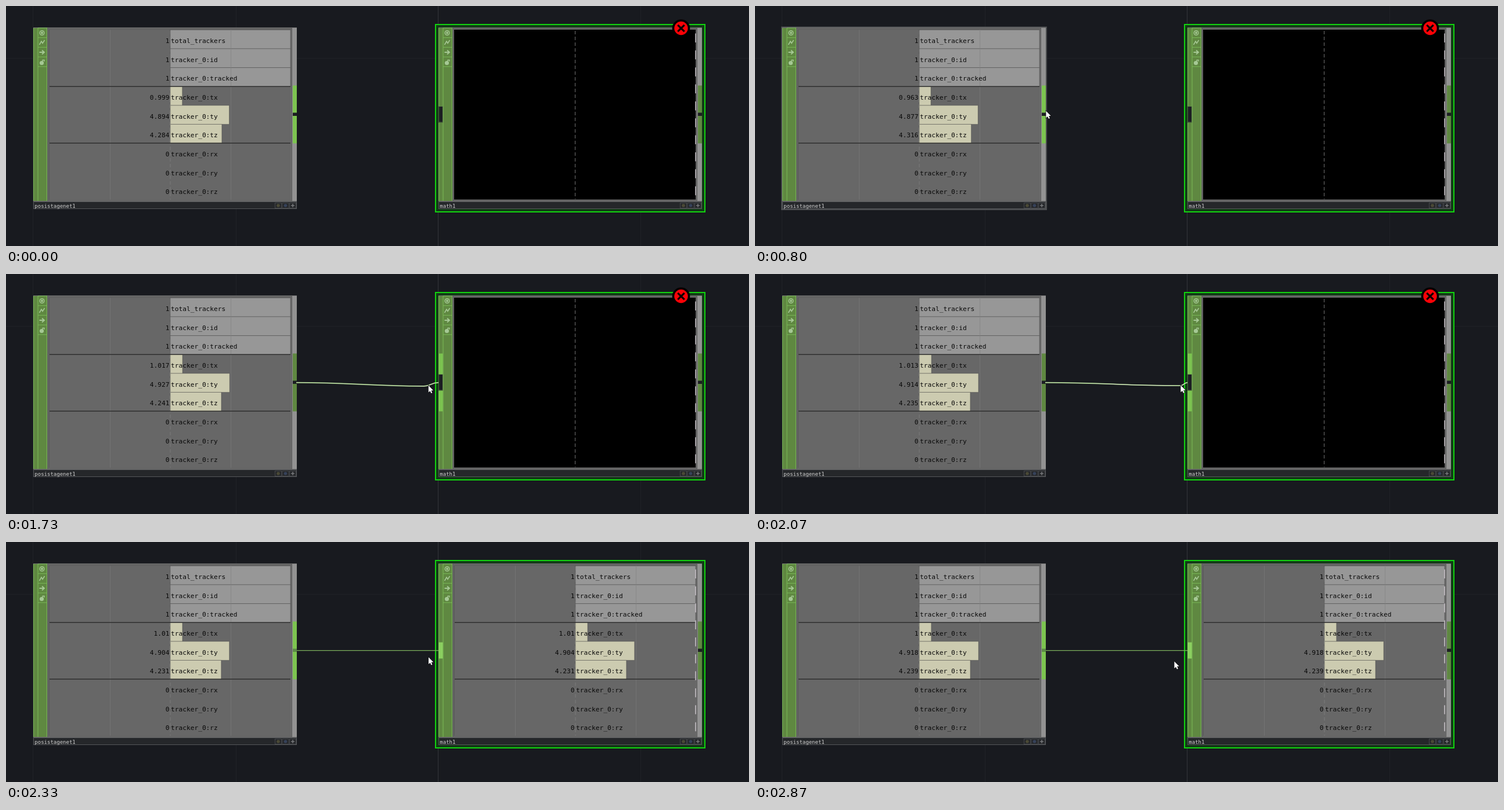
Write an HTML page with a canvas that moves like this. It is 1280 px wide and 415 px high and loops after 2940 ms.

```html
<!DOCTYPE html>
<html lang="en">
<head>
<meta charset="utf-8">
<title>Node wiring</title>
<style>
  html, body { margin: 0; width: 100%; height: 100%; overflow: hidden; background: #181a1f; }
  canvas { display: block; width: 100vw; height: 100vh; }
</style>
</head>
<body>
<canvas id="stage" width="1280" height="415"></canvas>
<script>
const ctx = document.getElementById('stage').getContext('2d');
const LOOP = 2940, STEP = 200 / 3, LAST = 43;
const HOVER = 599, LEAVE = 1199, DRAG = 1265, SNAP = 1665, JOIN = 2130;
const ROW_TOP = 41.3, ROW_H = 32.65, UNIT = 20.75;
const BACK = '#181a1f', GREEN = '#5f8841', BRIGHT = '#7cc450', LINE = '#79b857', DARK = '#1c1e22';
const MONO = '"DejaVu Sans Mono", monospace';
const NAMES = ['total_trackers',
  ...['id', 'tracked', 'tx', 'ty', 'tz', 'rx', 'ry', 'rz'].map(s => 'tracker_0:' + s)];

// turning points of the tracked position
const TRACK = [
  { at: 0, pos: [.999, 4.894, 4.284] },
  { at: 800, pos: [.963, 4.877, 4.316] },
  { at: 1267, pos: [1.022, 4.944, 4.248] },
  { at: 2333, pos: [1.01, 4.904, 4.231] },
  { at: 2867, pos: [1, 4.918, 4.239] }
];

const mix = (a, b, k) => a + (b - a) * k;
const progress = (t, from, length) => Math.min(1, Math.max(0, (t - from) / length));
const easeOut = (u, power) => 1 - (1 - u) ** power;

function tracked(t) {
  const next = Math.max(1, TRACK.findIndex(key => key.at >= t - 1));
  const a = TRACK[next - 1], b = TRACK[next];
  const k = progress(t, a.at, b.at - a.at);
  return a.pos.map((v, i) => mix(v, b.pos[i], k));
}

// the pointer comes in, drags the wire, then draws back
function pointerAt(t) {
  if (t < 1185) {
    const k = easeOut(progress(t, 200, 470), 2);
    return [mix(605, 501, k), mix(425, 181, k)];
  }
  if (t < JOIN) {
    const k = easeOut(progress(t, 1185, 720), 2.6);
    return [mix(502, 733, k), mix(182, 192, k) + 27 * k * (1 - k)];
  }
  const k = easeOut(progress(t, JOIN, 470), 1.2);
  return [mix(733, 722, k), mix(192, 206, k)];
}

function box(x, y, w, h, color) {
  ctx.fillStyle = color;
  ctx.fillRect(x, y, w, h);
}

function frame(x, y, w, h, color, width = 1) {
  ctx.strokeStyle = color;
  ctx.lineWidth = width;
  ctx.strokeRect(x, y, w, h);
}

function path(points, color, width = 1, dash = []) {
  ctx.beginPath();
  points.forEach(([x, y]) => ctx.lineTo(x, y));
  ctx.strokeStyle = color;
  ctx.lineWidth = width;
  ctx.setLineDash(dash);
  ctx.stroke();
  ctx.setLineDash([]);
}

const upright = (x, top, bottom, ...style) => path([[x, top], [x, bottom]], ...style);

function disc(x, y, r, color) {
  ctx.beginPath();
  ctx.arc(x, y, r, 0, Math.PI * 2);
  ctx.fillStyle = color;
  ctx.fill();
}

function label(text, x, y, size, color, align = 'left') {
  ctx.font = `${size}px ${MONO}`;
  ctx.textAlign = align;
  ctx.fillStyle = color;
  ctx.fillText(text, x, y);
}

function grid() {
  box(0, 0, 1280, 415, BACK);
  for (const x of [46, 396, 1093]) box(x, 0, 1, 415, '#202227');
  box(0, 90, 1280, 1, '#202227');
  box(744, 0, 1, 415, '#34363a');
}

function flagIcons() {
  const tone = '#a5c894';
  disc(62, 46.5, 4.5, tone);
  disc(62, 46.5, 3.1, GREEN);
  disc(62, 46.5, 1.9, tone);
  path([[57.5, 67], [61, 61], [63, 64.5], [66.5, 59]], tone, 1.6);
  path([[57.5, 80], [65, 80]], tone, 2);
  path([[62, 76.5], [66, 80], [62, 83.5]], tone, 1.8);
  disc(61.5, 98.5, 3.6, tone);
  path([[63, 97], [63, 93.5], [66, 93.5], [66, 96]], tone, 1.3);
}

function bar(row, value) {
  const y = ROW_TOP + row * ROW_H;
  const unit = row < 3;
  const width = unit ? 207 : value * UNIT;
  box(283, y, width, ROW_H, unit ? '#979797' : '#cccbb0');
  frame(283, y, width, ROW_H, 'rgba(60, 60, 60, .4)');
  if (unit) box(387, y, 1, ROW_H - 1, '#888');
}

function channels(values) {
  box(75, 41, 416, 294, '#676767');
  for (const x of [179, 387]) box(x, 41, 1, 294, '#737373');
  upright(283, 43, 335, '#7c7c7c', 1, [6, 4]);
  values.forEach((v, i) => { if (v) bar(i, v); });
  upright(283, 140, 237, '#96968a', 1, [6, 4]);
  for (const row of [3, 6]) box(75, ROW_TOP + row * ROW_H - .7, 415, 1.2, '#202020');
  values.forEach((v, i) => {
    const y = 64 + i * ROW_H;
    label(String(+v.toFixed(3)), 281.5, y, 11.2, '#080808', 'right');
    label(NAMES[i], 284, y, 11.2, '#080808');
  });
}

function emptyPanel() {
  box(74, 41, 416, 293.5, '#000');
  upright(282.5, 43, 334, '#707070', 1, [6, 4]);
}

function footer(name) {
  box(47, 338, 454, 13, '#25272a');
  frame(47.5, 338.5, 453, 12, '#55575a');
  label(name, 49.3, 348.5, 9, '#d0d0d0');
  for (let i = 0; i < 3; i++) frame(463.5 + i * 12.5, 340.5, 11, 9, '#45474a');
  disc(469, 345, 2.8, '#4b4a36');
  disc(481.5, 345, 2.8, '#36425a');
  path([[491, 345], [497, 345]], '#808285', 1.3);
  upright(494, 342, 348, '#808285', 1.3);
}

function node(dx, name, values, hot, joined) {
  ctx.save();
  ctx.translate(dx, 0);
  box(47, 37, 454, 301, '#5a5a5a');
  frame(47.5, 37.5, 453, 300, '#6c6c6c');
  box(48, 38, 23, 299, GREEN);
  for (const x of [47.5, 55, 70.5]) upright(x, 38, 337, LINE, 1.1);
  for (let i = 0; i < 5; i++) path([[55, 38 + i * 16.7], [71, 38 + i * 16.7]], LINE);
  flagIcons();
  box(71, 38, 422, 299, '#595959');
  frame(73, 39.5, 418.5, 296.5, '#707070');
  if (values) channels(values); else emptyPanel();
  box(493, 38, 8, 299, '#929292');
  box(494, 137.5, 7, 100, hot ? BRIGHT : GREEN);
  box(494, 184.5, 7, 5.5, joined ? '#5c8b46' : DARK);
  footer(name);
  ctx.restore();
}

function hoverRim() {
  box(45, 35.5, 458, 317.5, '#3e4043');
  frame(46, 36.5, 456, 315.5, '#56585b');
}

function selectionRim() {
  box(739, 31, 466, 326, '#123a16');
  frame(740, 32, 464, 324, '#12d40f', 2);
}

function inputPort(snapped, joined) {
  if (snapped && !joined) box(745, 137.5, 7.5, 100, BRIGHT);
  box(745, 173.5, 7.5, 28, joined ? '#8bd060' : DARK);
  if (!joined) frame(745.5, 173.5, 7, 27.5, '#6d9b54', .6);
}

function errorBadge() {
  const x = 1163, y = 38.5, arm = 5.7;
  disc(x, y, 15.3, '#000');
  disc(x, y, 11.7, '#fb0207');
  for (const side of [-arm, arm]) path([[x - side, y - arm], [x + side, y + arm]], '#000', 3.2);
}

function looseWire([x, y], snapped) {
  const bend = (x - 501) * .45;
  const end = y + (snapped ? 1 : 0);
  ctx.beginPath();
  ctx.moveTo(500, 187.7);
  ctx.bezierCurveTo(501 + bend, 187.7, x - bend, end, x, end);
  if (snapped) ctx.bezierCurveTo(mix(x, 745, .45), end, mix(x, 745, .5), 188, 745, 187.8);
  for (const [color, width] of [['#6fa552', 1.9], ['#dce8cb', 1.1]]) {
    ctx.strokeStyle = color;
    ctx.lineWidth = width;
    ctx.stroke();
  }
}

function pointer([x, y]) {
  const shape = [[0, 0], [0, 12], [2.7, 9.5], [4.6, 13.5], [6.5, 12.6], [4.7, 8.6], [8.3, 8.5]];
  ctx.beginPath();
  shape.forEach(([px, py]) => ctx.lineTo(x + .4 + px, y + .4 + py));
  ctx.closePath();
  ctx.strokeStyle = '#101114';
  ctx.lineWidth = 1.4;
  ctx.stroke();
  ctx.fillStyle = '#fff';
  ctx.fill();
}

function draw(ms) {
  const t = Math.min(LAST, Math.floor((ms + 3.5) / STEP)) * STEP;
  const values = [1, 1, 1, ...tracked(t), 0, 0, 0];
  const joined = t >= JOIN, snapped = t >= SNAP;

  grid();
  if (t >= HOVER && t < LEAVE) hoverRim();
  node(0, 'posistagenet1', values, t < LEAVE || joined, joined);
  selectionRim();
  node(698, 'math1', joined ? values : null, false, false);
  upright(1188, 47.5, 333, '#c9c2c9', 1.5, [15.5, 13.85]);
  inputPort(snapped, joined);
  if (!joined) errorBadge();
  if (joined) path([[501, 187.6], [745, 187.6]], '#7bb05c', 1.2);
  else if (t >= DRAG) looseWire(pointerAt(t - STEP), snapped);
  pointer(pointerAt(t));
}

function tick(now) {
  draw(now % LOOP);
  requestAnimationFrame(tick);
}
draw(0);
requestAnimationFrame(tick);
</script>
</body>
</html>
```
